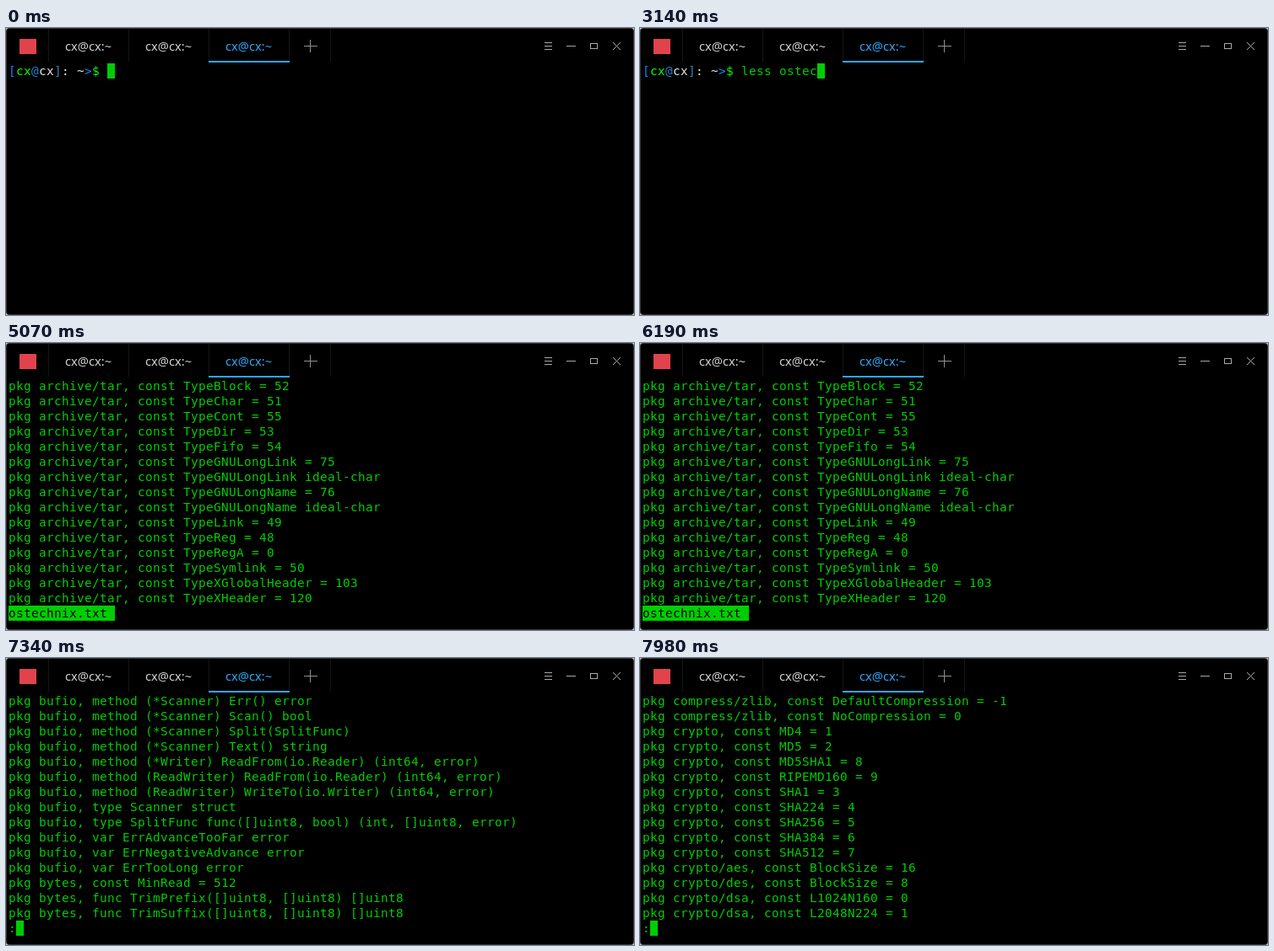
Animation, 744 px wide and 341 px high, one loop 8000 ms. Source, as an HTML page with a canvas:

```html
<!DOCTYPE html>
<html lang="en">
<head>
<meta charset="utf-8">
<title>Terminal</title>
<style>
  html, body { margin: 0; width: 100%; height: 100%; overflow: hidden; background: #000; }
  canvas { display: block; }
</style>
</head>
<body>
<canvas width="744" height="341"></canvas>
<script>
const ctx = document.querySelector('canvas').getContext('2d', { alpha: false });
const LOOP = 8000, CELL = 9, ROW = 18, LEFT = 3, TOP = 42;
const GREEN = '#00cd00', WHITE = '#e5e5e5', ACCENT = '#2ca7f8', GREY = '#a8a8a8';
const USER = 'cx', FILE = 'ostechnix.txt';

const COMMAND = `less ${FILE} `;
// [time, number of command characters present]; Tab completes the file name
const keys = [[820, 1], [1080, 2], [1735, 3], [1810, 4], [2100, 5], [2480, 6],
  [2610, 7], [2810, 8], [2950, 9], [3140, 10], [3440, COMMAND.length]];
const cursorOff = [[1660, 1735], [4010, 4600], [5590, 6190], [7250, 7295]];

const pages = [
  [5070, `archive/tar, const TypeBlock = 52
archive/tar, const TypeChar = 51
archive/tar, const TypeCont = 55
archive/tar, const TypeDir = 53
archive/tar, const TypeFifo = 54
archive/tar, const TypeGNULongLink = 75
archive/tar, const TypeGNULongLink ideal-char
archive/tar, const TypeGNULongName = 76
archive/tar, const TypeGNULongName ideal-char
archive/tar, const TypeLink = 49
archive/tar, const TypeReg = 48
archive/tar, const TypeRegA = 0
archive/tar, const TypeSymlink = 50
archive/tar, const TypeXGlobalHeader = 103
archive/tar, const TypeXHeader = 120`],
  [6720, `archive/tar, func FileInfoHeader(os.FileInfo, string) (*Header, error)
archive/tar, method (*Header) FileInfo() os.FileInfo
archive/zip, const Deflate = 8
archive/zip, const Store = 0
archive/zip, type FileHeader struct, CompressedSize64 uint64
archive/zip, type FileHeader struct, UncompressedSize64 uint64
bufio, const MaxScanTokenSize = 65536
bufio, const MaxScanTokenSize ideal-int
bufio, func NewScanner(io.Reader) *Scanner
bufio, func ScanBytes([]uint8, bool) (int, []uint8, error)
bufio, func ScanLines([]uint8, bool) (int, []uint8, error)
bufio, func ScanRunes([]uint8, bool) (int, []uint8, error)
bufio, func ScanWords([]uint8, bool) (int, []uint8, error)
bufio, method (*Reader) WriteTo(io.Writer) (int64, error)
bufio, method (*Scanner) Bytes() []uint8`],
  [7295, `bufio, method (*Scanner) Err() error
bufio, method (*Scanner) Scan() bool
bufio, method (*Scanner) Split(SplitFunc)
bufio, method (*Scanner) Text() string
bufio, method (*Writer) ReadFrom(io.Reader) (int64, error)
bufio, method (ReadWriter) ReadFrom(io.Reader) (int64, error)
bufio, method (ReadWriter) WriteTo(io.Writer) (int64, error)
bufio, type Scanner struct
bufio, type SplitFunc func([]uint8, bool) (int, []uint8, error)
bufio, var ErrAdvanceTooFar error
bufio, var ErrNegativeAdvance error
bufio, var ErrTooLong error
bytes, const MinRead = 512
bytes, func TrimPrefix([]uint8, []uint8) []uint8
bytes, func TrimSuffix([]uint8, []uint8) []uint8`],
  [7690, `bytes, method (*Buffer) Grow(int)
bytes, method (*Reader) WriteTo(io.Writer) (int64, error)
compress/flate, const BestCompression = 9
compress/flate, const BestSpeed = 1
compress/flate, const DefaultCompression = -1
compress/flate, const NoCompression = 0
compress/gzip, const BestCompression = 9
compress/gzip, const BestSpeed = 1
compress/gzip, const DefaultCompression = -1
compress/gzip, const NoCompression = 0
compress/gzip, method (*Writer) Flush() error
compress/lzw, const LSB = 0
compress/lzw, const MSB = 1
compress/zlib, const BestCompression = 9
compress/zlib, const BestSpeed = 1`],
  [7980, `compress/zlib, const DefaultCompression = -1
compress/zlib, const NoCompression = 0
crypto, const MD4 = 1
crypto, const MD5 = 2
crypto, const MD5SHA1 = 8
crypto, const RIPEMD160 = 9
crypto, const SHA1 = 3
crypto, const SHA224 = 4
crypto, const SHA256 = 5
crypto, const SHA384 = 6
crypto, const SHA512 = 7
crypto/aes, const BlockSize = 16
crypto/des, const BlockSize = 8
crypto/dsa, const L1024N160 = 0
crypto/dsa, const L2048N224 = 1`]
];

function rect(x, y, w, h, color) {
  ctx.fillStyle = color;
  ctx.fillRect(x, y, w, h);
}

function cells(col, row, count) {
  rect(LEFT + col * CELL, TOP + row * ROW, count * CELL, ROW, GREEN);
}

// Writes on the character grid and returns the next free column
function write(text, col, row, color = GREEN) {
  ctx.font = '14.4px "DejaVu Sans Mono", monospace';
  ctx.fillStyle = color;
  for (const ch of text) ctx.fillText(ch, LEFT + CELL * col++, TOP + 14 + row * ROW);
  return col;
}

function line(x1, y1, x2, y2) {
  ctx.beginPath();
  ctx.moveTo(x1, y1);
  ctx.lineTo(x2, y2);
  ctx.stroke();
}

function drawWindow() {
  rect(0, 0, 744, 341, '#c8c8c8');
  ctx.fillStyle = '#000';
  ctx.lineWidth = 1;
  ctx.strokeStyle = '#303030';
  ctx.beginPath();
  ctx.roundRect(0.5, 0.5, 743, 340, 3);
  ctx.fill();
  ctx.stroke();

  rect(16, 13, 20, 18, '#e0434c');
  for (const x of [50, 145, 240, 335, 384]) rect(x, 1, 1, 39, '#161616');
  ctx.font = '14.67px "Noto Sans", sans-serif';
  [70, 165, 260].forEach((x, i) => {
    ctx.fillStyle = i === 2 ? ACCENT : '#d0d0d0';
    ctx.fillText(`${USER}@${USER}:~`, x, 27);
  });
  rect(240, 39, 96, 2, ACCENT);

  rect(353, 21, 16, 1, '#909090');
  rect(360, 14, 1, 15, '#909090');
  for (const y of [17, 21, 25]) rect(638, y, 9, 1, GREY);
  rect(664, 21, 11, 1, GREY);
  ctx.strokeStyle = GREY;
  ctx.strokeRect(692.5, 18.5, 8, 6);
  line(719, 17, 728, 26);
  line(728, 17, 719, 26);
}

function drawPrompt(time) {
  const parts = [['[', '#1e80f0'], [USER, '#00ff00'], ['@', '#2482d8'], [USER, WHITE],
    [']', '#3484a8'], [': ~', WHITE], ['>', '#1e80f0'], ['$ ', '#00ff00']];
  const start = parts.reduce((col, [text, color]) => write(text, col, 0, color), 0);
  const key = keys.findLast(([at]) => time >= at);
  return write(COMMAND.slice(0, key ? key[1] : 0), start, 0);
}

function drawPage(page) {
  page[1].split('\n').forEach((text, row) => write('pkg ' + text, 0, row));
  if (page !== pages[0]) return write(':', 0, 15);
  cells(0, 15, FILE.length);
  return write(FILE, 0, 15, '#000');
}

function render(now) {
  const time = now % LOOP;
  const page = pages.findLast(([at]) => time >= at);
  drawWindow();
  const col = page ? drawPage(page) : drawPrompt(time);
  if (!cursorOff.some(([from, to]) => time >= from && time < to)) cells(col, page ? 15 : 0, 1);
}

const start = performance.now();
function tick() {
  render(performance.now() - start);
  requestAnimationFrame(tick);
}
tick();
</script>
</body>
</html>
```
